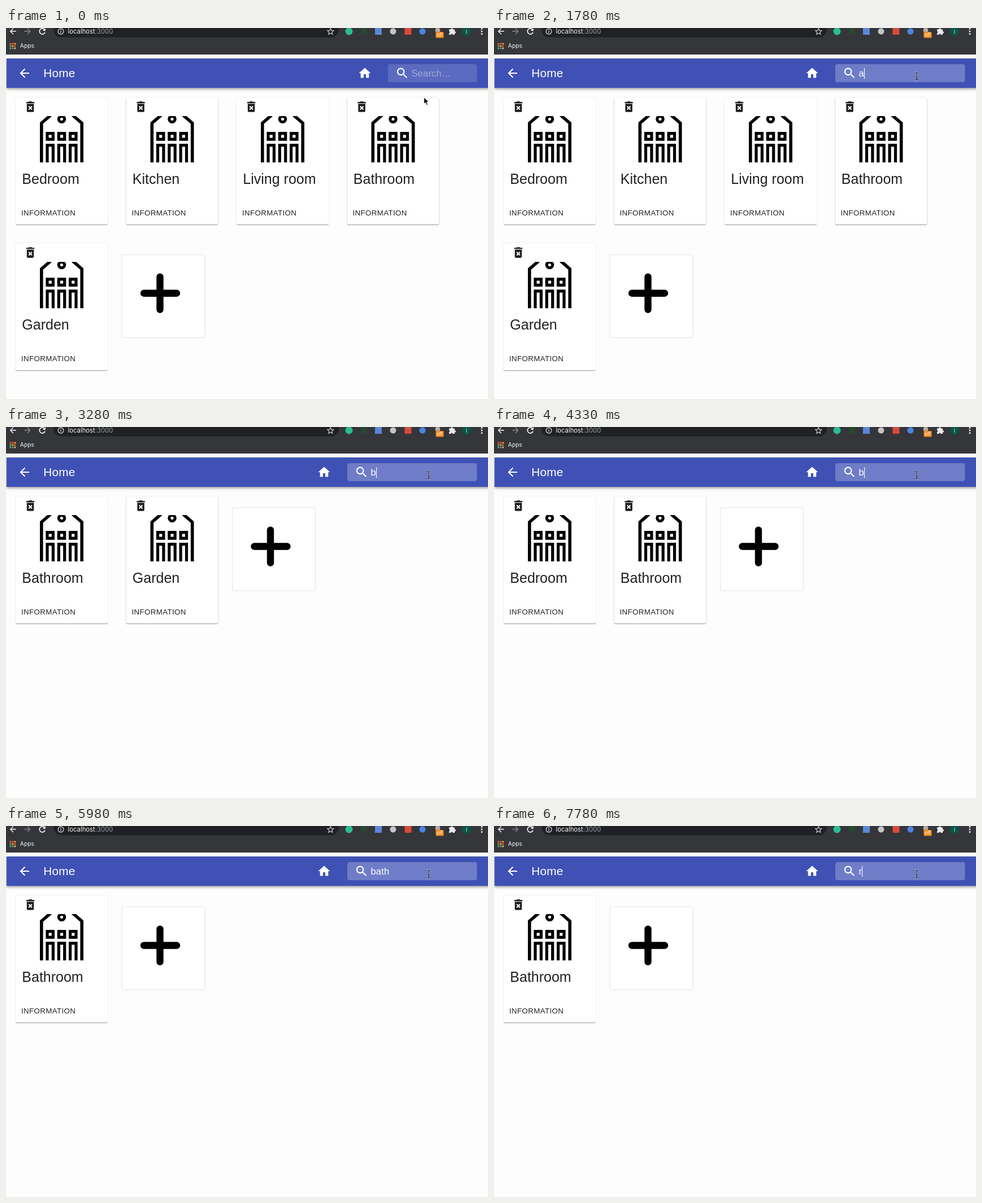
These frames come from a looping animation (853 px wide and 657 px high, 8000 ms). An HTML page:

```html
<!DOCTYPE html>
<html lang="en">
<head>
<meta charset="utf-8">
<title>Rooms</title>
<style>
html, body { margin: 0; width: 100%; height: 100%; overflow: hidden; background: #fdfdfd; }
svg { display: block; }
text { white-space: pre; }
.ui { font-family: "Liberation Sans", Arial, sans-serif; }
.chrome { font-family: Inter, sans-serif; }
.paper { filter: drop-shadow(0 1px .6px rgba(0,0,0,.36)) drop-shadow(0 0 1px rgba(0,0,0,.12)); }
.bar { filter: drop-shadow(0 2px 2px rgba(0,0,0,.3)) drop-shadow(0 1px 3px rgba(0,0,0,.16)); }
</style>
</head>
<body>
<svg width="853" height="657" viewBox="0 0 853 657">
  <defs>
    <clipPath id="cut"><rect x="40" y="33" width="84" height="82"/></clipPath>
    <g id="house" clip-path="url(#cut)" fill="none" stroke="#000" stroke-width="5.2">
      <path d="M45.8 116V45.500L62 31.500M117.200 116V45.500L101 31.500" stroke-width="5.6"/>
      <circle cx="81.500" cy="38.300" r="5.200"/>
      <path id="bay" d="M56 63.700h10.400v10.400H56zM56 116V84.600h10.400V116"/>
      <use href="#bay" x="20.300"/>
      <use href="#bay" x="40.600"/>
    </g>
    <path id="bin" d="M6 19c0 1.100.9 2 2 2h8c1.100 0 2-.9 2-2V7H6v12zm2.460-7.120 1.410-1.410L12 12.590l2.120-2.120 1.410 1.410L13.410 14l2.120 2.120-1.410 1.410L12 15.410l-2.120 2.120-1.410-1.410L10.590 14l-2.130-2.120zM15.500 4l-1-1h-5l-1 1H5v2h14V4z"/>
    <path id="back" d="M20 11H7.830l5.590-5.590L12 4l-8 8 8 8 1.410-1.410L7.830 13H20v-2z"/>
  </defs>

  <!-- browser toolbar -->
  <g class="chrome">
    <rect width="853" height="47" fill="#35363a"/>
    <rect x="84" y="-12" width="505" height="28.500" rx="14" fill="#202124"/>
    <use href="#back" transform="translate(4 -2.600) scale(.7)" fill="#f1f3f4"/>
    <use href="#back" transform="translate(46.500 -2.600) scale(-.7 .7)" fill="#85878b"/>
    <path d="M68.300 3A5 5 0 1 0 69 7.500" fill="none" stroke="#f1f3f4" stroke-width="1.700"/>
    <path d="M69.800 0v5h-5z" fill="#f1f3f4"/>
    <circle cx="97" cy="6" r="4.900" fill="none" stroke="#dfe1e5" stroke-width="1.200"/>
    <path d="M97 5.300v3.500M97 3v1.300" stroke="#dfe1e5" stroke-width="1.300"/>
    <text x="109.500" y="10" font-size="11.300" fill="#f1f3f4">localhost<tspan fill="#9aa0a6">:3000</tspan></text>
    <path d="M574.300.8l1.600 3.600 3.900.4-2.900 2.600.8 3.900-3.400-2-3.400 2 .8-3.900-2.900-2.600 3.900-.4z" fill="none" stroke="#c8cacd" stroke-width="1.200"/>
    <circle cx="607" cy="6" r="6.500" fill="#2bbd92"/>
    <rect x="627.500" y="0" width="11" height="11" fill="#28482f"/>
    <rect x="653" y="0" width="12" height="12" fill="#5b87d8"/>
    <circle cx="685" cy="6" r="5.500" fill="#c4c5c7"/>
    <rect x="705.500" y="0" width="12" height="12" fill="#d84a3a"/>
    <circle cx="737" cy="6" r="5.500" fill="#4a85e6"/>
    <circle cx="764" cy="4" r="4.500" fill="#b9a99a"/>
    <rect x="760.500" y="7" width="14" height="10.500" rx="1.500" fill="#f58a1f"/>
    <text x="767.500" y="15.300" font-size="8" text-anchor="middle" fill="#fff">off</text>
    <path d="M784 2.500h3a2 2 0 0 1 4 0h3v3.200a2 2 0 0 1 0 4V12h-3.300a1.800 1.800 0 0 0-3.500 0H784V9a1.800 1.800 0 0 0 0-3.500z" fill="#e8eaed"/>
    <circle cx="815" cy="6" r="8.300" fill="#0b5548"/>
    <text x="815" y="9.500" font-size="9.500" text-anchor="middle" fill="#e8eaed">I</text>
    <g fill="#e8eaed"><circle cx="842" cy="1.500" r="1.500"/><circle cx="842" cy="6" r="1.500"/><circle cx="842" cy="10.500" r="1.500"/></g>
    <g id="dots"></g>
    <text x="24.800" y="35.300" font-size="10.300" fill="#f1f3f4">Apps</text>
  </g>

  <g class="ui">
    <rect class="bar" x="1" y="54" width="854" height="52" fill="#3f51b5"/>
    <use href="#back" transform="translate(20.300 67.500) scale(1.040)" fill="#fff"/>
    <text x="66.300" y="86.500" font-size="20.800" letter-spacing=".15" fill="#fff">Home</text>
    <rect id="field" y="64" height="32" rx="4" fill="#fff"/>
    <g id="slide">
      <path transform="translate(-53.500 67.500) scale(1.040)" d="M10 20v-6h4v6h5v-8h3L12 3 2 12h3v8z" fill="#fff"/>
      <path transform="translate(12.800 67.500) scale(1.040)" d="M15.500 14h-.79l-.28-.27A6.500 6.500 0 1 0 13.730 14.430l.27.280v.79l5 4.990L20.490 19l-4.990-5zm-6 0a4.500 4.500 0 1 1 0-9 4.500 4.500 0 0 1 0 9z" fill="#fff"/>
      <text id="query" x="41.400" y="85.700" font-size="16.600" letter-spacing=".156" fill="#fff"></text>
      <rect id="caret" y="71" width="1.100" height="19" fill="#fff"/>
    </g>
    <g id="rooms"></g>
    <g id="add">
      <rect x=".5" y=".5" width="147" height="147" rx="3" fill="#fff" stroke="#e2e2e2"/>
      <path d="M39.500 69H97.500M68 40V98" stroke="#000" stroke-width="12.400" stroke-linecap="round"/>
    </g>
  </g>

  <path id="arrow" transform="translate(739.700 122.700)" d="M0 0V11.800l2.700-2.500 2 4.600 2.100-.9-2-4.500h3.700z" fill="#000" stroke="#fff" stroke-width=".9"/>
  <g id="beam" fill="none">
    <path id="beamLine" d="M-3-6.500Q0-6.500 0-4.500Q0-6.500 3-6.500M0-4.500V4.500M-3 6.500Q0 6.500 0 4.500Q0 6.500 3 6.500M-1.800 2h3.600" stroke="#fff" stroke-opacity=".6" stroke-width="2.600"/>
    <use href="#beamLine" style="filter:brightness(0)"/>
    <path d="M-3-6.500Q0-6.500 0-4.500Q0-6.500 3-6.500M0-4.500V4.500M-3 6.500Q0 6.500 0 4.500Q0 6.500 3 6.500M-1.800 2h3.600" stroke="#15182c" stroke-width="1.200"/>
  </g>
</svg>
<script>
const LOOP = 8000, STEP_X = 195.500, STEP_Y = 258.200;
const $ = id => document.getElementById(id);
const move = (el, x, y) => el.setAttribute('transform', `translate(${x} ${y})`);
$('beam').children[1].remove();

const tints = ['#e8553f', '#e8553f', '#f0a030', '#4fae62', '#f0a030', '#e8553f', '#4fae62', '#4a86e0', '#f0b43c'];
$('dots').innerHTML = tints.map((c, i) =>
  `<rect x="${6.300 + i % 3 * 4}" y="${26.500 + (i / 3 | 0) * 4}" width="3" height="3" rx=".8" fill="${c}"/>`).join('');

const names = ['Bedroom', 'Kitchen', 'Living room', 'Bathroom', 'Garden'];
const cards = names.map(name => {
  const g = document.createElementNS('http://www.w3.org/2000/svg', 'g');
  g.innerHTML = `<rect class="paper" width="163" height="225" rx="3" fill="#fff"/>
    <use href="#bin" transform="translate(13.600 3.900) scale(1.040)" fill="#1c1c1c"/>
    <use href="#house"/>
    <text x="11.300" y="152.700" font-size="25" fill="#212121">${name}</text>
    <text x="10" y="208.800" font-size="13.300" letter-spacing=".38" fill="#212121">INFORMATION</text>`;
  $('rooms').append(g);
  return g;
});

// Each entry changes part of the state from its time on.
const timeline = [
  [0, { left: 676, text: '', caret: 0, hover: 0, beamY: 0, shown: names }],
  [140, { hover: 1, beamY: 88 }],
  [290, { beamY: 84 }],
  [590, { left: 675.500, caret: 1 }],
  [740, { left: 612 }],
  [880, { left: 604 }],
  [1030, { beamY: 85 }],
  [1180, { caret: 0 }],
  [1630, { caret: 1 }],
  [1780, { text: 'a' }],
  [2080, { shown: ['Bathroom', 'Garden'] }],
  [2230, { caret: 0 }],
  [2830, { caret: 1 }],
  [2980, { text: '' }],
  [3280, { text: 'b' }],
  [3580, { shown: ['Bedroom', 'Bathroom'] }],
  [3880, { caret: 0 }],
  [4330, { caret: 1 }],
  [4480, { text: '' }],
  [4780, { caret: 0 }],
  [4930, { text: 'b', caret: 1 }],
  [5080, { text: 'ba' }],
  [5230, { text: 'bat' }],
  [5380, { text: 'bath' }],
  [5830, { shown: ['Bathroom'] }],
  [5980, { caret: 0 }],
  [6430, { caret: 1 }],
  [6730, { text: 'bat' }],
  [6880, { text: 'ba' }],
  [7030, { text: 'b' }],
  [7180, { text: '', caret: 0 }],
  [7330, { caret: 1 }],
  [7780, { text: 'r' }]
];
const advance = { a: .556, b: .556, t: .278, h: .556, r: .333 };

function render(s) {
  $('field').setAttribute('x', s.left);
  $('field').setAttribute('width', 833.500 - s.left);
  $('field').setAttribute('fill-opacity', s.hover ? .25 : .15);
  move($('slide'), s.left, 0);
  $('query').textContent = s.text || 'Search…';
  $('query').setAttribute('fill-opacity', s.text ? 1 : .42);
  const width = [...s.text].reduce((w, c) => w + advance[c] * 16.600 + .156, 0);
  $('caret').setAttribute('x', Math.round(41.400 + width));
  $('caret').style.display = s.caret ? '' : 'none';
  $('arrow').style.display = s.hover ? 'none' : '';
  $('beam').style.display = s.hover ? '' : 'none';
  move($('beam'), 748.300, s.beamY);

  const at = (el, i, x, y) => move(el, x + i % 4 * STEP_X, y + (i / 4 | 0) * STEP_Y);
  cards.forEach((card, i) => {
    const slot = s.shown.indexOf(names[i]);
    card.style.display = slot < 0 ? 'none' : '';
    if (slot >= 0) at(card, slot, 17, 123);
  });
  at($('add'), s.shown.length, 9, 142.500);
}

let last = -1;
function tick() {
  const t = performance.now() % LOOP;
  const past = timeline.filter(([start]) => start <= t);
  if (past.length !== last) {
    last = past.length;
    render(Object.assign({}, ...past.map(([, change]) => change)));
  }
  requestAnimationFrame(tick);
}
tick();
</script>
</body>
</html>
```
